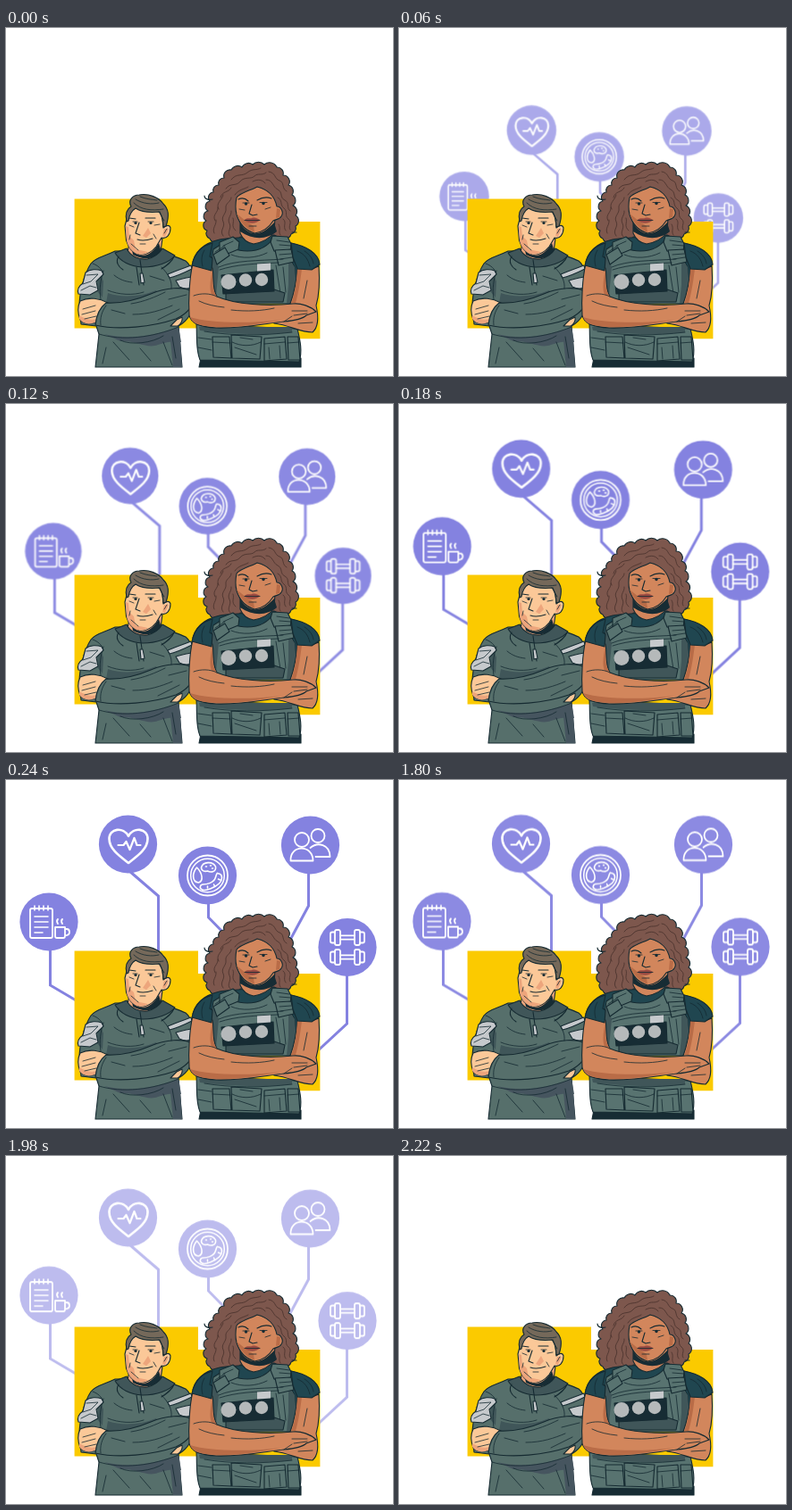
Write an HTML page that moves like this. It is 433x390 px and loops after 2.25 s.

```html
<!DOCTYPE html>
<html lang="en">
<head>
<meta charset="utf-8">
<title>Team wellbeing</title>
<style>
  html, body { margin: 0; width: 100%; height: 100%; overflow: hidden; background: #fff; }
  svg { display: block; width: 433px; height: 390px; }
  .people { stroke: #152a31; stroke-width: 1.1; stroke-linejoin: round; stroke-linecap: round; }
  .line { fill: none; }
  .thin { fill: none; stroke-width: .8; }
  .flat { stroke: none; }
  .jacket { fill: #566f6b; }
  .shade { fill: #405659; }
  .slate { fill: #46555f; }
  .vest { fill: #587370; }
  .shirt { fill: #204650; }
  .ink { fill: #172c34; }
  .grey { fill: #c6c9cc; }
  .pale { fill: #fbc898; }
  .paleShade { fill: #eda57c; }
  .tan { fill: #d2865c; }
  .tanShade { fill: #b96c47; }
  .hairM { fill: #75695a; }
  .hairW { fill: #7d574d; }
  .curl { fill: none; stroke: #4d352f; stroke-width: .9; }
  .links { fill: none; stroke: #8482e0; stroke-width: 3; }
  .icon { fill: none; stroke: #fff; stroke-width: 1.8; stroke-linejoin: round; stroke-linecap: round; }
  .disc { fill: #8482e0; stroke: none; }
</style>
</head>
<body>
<svg viewBox="0 0 433 390">
  <defs>
    <circle id="disc" class="disc" r="32.6"/>
    <g id="dumbbell">
      <path d="M-8-2.2H8M-8 2.2H8"/>
      <rect x="-14" y="-8.5" width="6" height="17" rx="2"/>
      <rect x="8" y="-8.5" width="6" height="17" rx="2"/>
      <path d="M-14-6h-3q-2 0-2 2v8q0 2 2 2h3M14-6h3q2 0 2 2v8q0 2-2 2h-3"/>
    </g>
  </defs>

  <g id="icons" opacity="0">
    <path class="links" d="M49.500 188V230L86 251.500M138 102 170.500 130V200M226.500 137V154L248 176M338.500 103V141L311 192M381.500 218V273L345 307"/>

    <g class="icon" transform="translate(48 159)">
      <use href="#disc"/>
      <path d="M-19-15H2q2 0 2 2V16q0 2-2 2H-19q-2 0-2-2V-13q0-2 2-2Z"/>
      <path d="M-16-18v5M-11-18v5M-6-18v5M-1-18v5M-16-6H-1M-16 0H-1M-16 6H-1M-16 12H-7" stroke-width="1.6"/>
      <path d="M7 6H18V16q0 2-2 2H9q-2 0-2-2ZM18 8h2q3 0 3 3.500t-5 4M10-3q-2 2 0 5M15-3q-2 2 0 5"/>
    </g>

    <g class="icon" transform="translate(136.500 72)">
      <use href="#disc"/>
      <path stroke-width="2.600" d="M.5 21C-10 13-21 5-21-6C-21-18-5-20 .5-9C6-20 22-18 22-6C22 5 11 13 .5 21Z"/>
      <path stroke-width="2.200" d="M-11 1H-5L-2-3 2 6 7-7 10 1H14"/>
    </g>

    <g class="icon" transform="translate(225.500 107)">
      <use href="#disc"/>
      <circle r="22.500"/>
      <circle r="18.800" stroke-width="1.500"/>
      <g stroke-width="1.600">
        <path d="M-12-9C-6-3-4 6-10 8C-18 7-17-3-12-9Z"/>
        <path d="M-7-9C-5-16 6-16 9-10C10-4 4-3 0-5C-3-4-7-5-7-9Z"/>
        <path d="M-2-10h1M3-11h1M5-8h1"/>
        <path d="M13-2c4 1 4 7 0 11S-2 18-6 16s-2-6 1-6S7 9 9 2 11-2 13-2ZM12 4l2 1M7 10l1 2M0 12v2"/>
      </g>
    </g>

    <g class="icon" transform="translate(340.500 73)" stroke-width="1.600">
      <use href="#disc"/>
      <circle cx="-9.500" cy="-6" r="8"/>
      <path d="M-22 17.500C-23-1 3-1 3 17.500Z"/>
      <circle cx="8.500" cy="-10.500" r="7.500"/>
      <path d="M0 3C8-4 22-1 22 13H6"/>
    </g>

    <g class="icon" transform="translate(382 187.500)">
      <use href="#disc"/>
      <use href="#dumbbell" y="-11"/>
      <use href="#dumbbell" y="11"/>
    </g>
  </g>

  <path fill="#fbca00" d="M76.600 191.500H215V217H351.400V348.300H230V336.500H76.600Z"/>

  <!-- man -->
  <g class="people">
    <path class="jacket" d="M122 250C110 256 100 257 95 264C87 276 82 298 82 312L84 332 101 334 104 343 100 380H197L193 334C204 328 211 316 211 300C211 284 210 268 201 261C190 256 180 254 174 249Z"/>
    <path class="slate flat" d="M110 343C138 350 166 345 193 335L196 352C188 350 180 352 170 355C158 360 146 350 128 351ZM184 350l11-2 2 32h-10Z"/>
    <path class="thin" d="M104 343c26 8 60 4 89-8M120 352l18 20M128 350c12 6 36 3 48-5M176 352l10 26M112 358l-4 18M150 359l12 14M186 346l4 24"/>
    <path class="paleShade" d="M138 240L136 252C144 260 158 262 172 258L175 236Z"/>
    <path class="ink flat" d="M141 249c8 9 20 9 30-8l3 10c-8 9-22 9-32 3Z"/>
    <path class="shade" d="M122 252L135 247C139 256 149 260 158 259C166 257 172 252 175 247L189 255C183 263 168 268 153 268C139 267 128 262 122 252Z"/>
    <path class="line" d="M150 260l4 28M146 268l3 20M126 256c-4 6 0 12 5 15M188 256c-2 6-8 10-14 14"/>
    <path class="grey" d="M150 275h3l2 10-4 1Z"/>

    <path class="pale" d="M137 206L133 222 134.500 238C137 246 142 252 149 254C156 255 163 251 168 245L174 235C180 237 184 231 184 224C183 220 179 221 176 224L174 204C162 201 148 198 137 206Z"/>
    <path class="paleShade flat" d="M134 222l3 1 1 10 5 5 2 10 14 3c-4 3-9 3-13 2-6-3-10-9-11-15ZM177 225l5 0-4 9-3-1ZM159 224l3 6-5 5-4-2Z"/>
    <path class="hairM" d="M135 217C133 209 135 203 140 200C136 193 142 187 149 187C160 185 171 190 176 197C182 203 183 210 179 222L176 223C176 216 174 210 172 206C162 207 151 206 145 202C140 205 138 210 137 216Z"/>
    <path class="thin" d="M143 196c8 8 20 9 33 7M145 192c8 5 18 6 26 4M150 189c7 3 13 3 19 4M171 206l6 10"/>
    <path class="line" d="M138 213l7 1M156 213l11 0M149 218l-4 12 5 2M147 237c6 2 11 1 17-1"/>
    <path class="thin" d="M142 217h5M159 217h6M138 221l5 2M166 221l6-1M139 232l-1 5M165 231l3 5M150 242l6 0M140 242l8 7M180 225l-3 5"/>
    <g class="ink flat"><circle cx="145" cy="218.500" r="1.600"/><circle cx="162" cy="218.500" r="1.600"/></g>

    <path class="shade flat" d="M114 297c14 5 34 5 54-3l2 4c-18 7-42 9-58 10ZM103 270l6 14-1 18-6-7Z"/>
    <path class="pale" d="M83 306C93 301 105 303 114 308L106 326C99 332 89 333 83 327C80 319 80 312 83 306Z"/>
    <path class="paleShade flat" d="M82 322c8 5 15 6 23 3l-3 4c-8 4-16 3-20-3Z"/>
    <path class="thin" d="M86 315l14-4M85 321l15-4M88 326l13-3"/>
    <path class="jacket" d="M112 308C132 309 148 304 162 298C178 291 198 289 211 296C212 309 204 320 190 326C164 335 126 339 100 333C101 322 104 314 112 308Z"/>
    <path class="thin" d="M112 311c-5 7-7 14-6 22M140 309c14-2 28-8 38-13M142 321c18 0 32-5 44-10M170 327l24-12M182 304l20-5M118 316l15 4M106 304c-2-12 0-22 3-32M114 294c12 5 28 6 40 2M174 268c8 8 12 16 11 24M161 278l16 5M121 277c6 5 12 7 20 8M97 264c6 2 10 6 12 11"/>
    <path class="pale" d="M184 334l7-7 6-3c1 4-2 9-5 10Z"/>

    <path class="grey" d="M89 274C94 270 102 270 107 272L109 276 101 284 103 294 94 299 81 298C79 292 83 288 86 286Z"/>
    <path class="thin" d="M90 277l13-1-8 8-9 3M84 294l10-5 7 2"/>
    <path class="grey" d="M181 276C190 272 199 269 207 266L208 270C200 274 192 278 183 280Z"/>
    <path class="grey" d="M190 283C197 281 204 279 209 279L210 290C204 293 198 292 194 290Z"/>
  </g>

  <!-- woman -->
  <g class="people">
    <path class="hairW" d="M228 236a6 6 0 0 1-3-9a6 6 0 0 1-1-11a6 6 0 0 1 2-11a6 6 0 0 1 2-11a6 6 0 0 1 4-10a6 6 0 0 1 6-8a6 6 0 0 1 6-8a7 7 0 0 1 8-9a8 8 0 0 1 12-3a8 8 0 0 1 12-3a9 9 0 0 1 13 0a9 9 0 0 1 14 3a7 7 0 0 1 7 9a7 7 0 0 1 6 11a7 7 0 0 1 4 11a7 7 0 0 1 1 12a7 7 0 0 1 3 11a7 7 0 0 1 0 12a7 7 0 0 1-5 9a7 7 0 0 1-9 5L262 234a8 8 0 0 1-13 5a8 8 0 0 1-12 0a6 6 0 0 1-9-3Z"/>
    <path class="line" d="M231 192c-4 1-9 0-9-4M320 229l5 0"/>
    <path class="curl" d="M252 170c6-8 12-3 18-8s10-2 15-5M246 180c5-7 11-2 16-8s12-2 16-6 8 0 13-4M240 190c2-8 9-5 12-11M238 203c-4-7 4-10 5-16M234 216c-4-7 4-9 3-15M233 230c-3-6 3-9 2-15M243 233c-5-6 3-10 0-16s4-9 3-15 6-7 6-12M251 234c-5-5 2-9-1-15s3-9 2-14M257 227c-6-5-1-9-3-14M294 161c8 1 6 8 12 10s2 9 8 12M291 170c8 0 7 8 13 11s2 9 8 12 1 9 6 12M304 190c6 3 2 8 7 12s0 8 5 12-1 8 2 12M310 214c5 4-1 8 3 13M305 220c3 5-1 8 2 12M276 172c6-3 11-2 14 2M256 187c4-6 10-6 15-9"/>

    <path class="shirt" d="M246 236C228 238 213 246 209 262L210 268 231 271 240 300H322L327 270 343 270 350 266C349 253 336 246 319 241L300 232Z"/>
    <path class="tan" d="M262 216L262 230C265 237 271 241 277 242C288 240 295 236 300 229L301 212Z"/>
    <path class="ink flat" d="M262 218C268 230 282 238 300 218L303 228C292 237 277 238 262 228Z"/>
    <path class="tan" d="M258 190C263 184 274 182 281 178C294 181 301 190 303 200C308 200 311 207 308 211C306 215 302 214 299 216C294 224 287 229 278 230C268 227 261 219 258 209C256 201 257 195 258 190Z"/>
    <path class="tanShade flat" d="M258 208c4 9 9 16 20 21l-1-7-9-6ZM303 202l4 1-1 9-4 1Z"/>
    <path class="line" d="M260 192c4-2 8-1 11 2M281 193c5-3 11-4 16-2M275 198l-3 10 4 2 5-1"/>
    <path fill="#9a4b42" class="flat" d="M267 215c3-3 6-1 8-2 3-1 6 0 9 2-4 5-13 5-17 0Z"/>
    <path class="thin" d="M265 196h7M284 195.500h8M267 215.500h17M261 203l6 1M290 203l6-2M272 222h8"/>
    <g class="ink flat"><circle cx="268.500" cy="197" r="1.700"/><circle cx="288" cy="196.500" r="1.700"/></g>

    <path class="vest" d="M232 248L246 239C250 246 258 250 270 250C284 250 294 244 300 234L317 240C315 250 318 260 323 268L326 309H232C229 290 228 268 232 248Z"/>
    <path class="shade flat" d="M232 251l6 17-3 32h-4c-2-17-2-33 1-49ZM316 258l7 10 3 40h-12l2-20Z"/>
    <path class="vest" d="M239 240l15-6 7 6-1 8-17 7-4-3ZM298 233l17 1 4 8-1 10-18-2-4-10Z"/>
    <path class="vest" d="M232 254l13-8 5 9-14 10ZM301 249l18-1 3 14-17 4Z"/>
    <path class="thin" d="M243 244l11-5M234 251l11-7M303 238l14 2M306 243l13 1M306 254l13-1M307 259l13-2M238 268c18-8 44-7 72-9M239 271c18-6 40-7 66-8M252 254c12 5 28 4 40-2M310 268l3 28M302 266l5 31"/>
    <path class="shade" d="M246 296l54-3 12 4-2 10H246Z"/>
    <path class="ink" d="M241 277L299 271 300 295 243 298Z"/>
    <path class="grey flat" d="M281 264.500l15-1v8l-15 1Z"/>
    <g fill="#b5b9ba" class="flat"><circle cx="249" cy="284.500" r="8.500"/><circle cx="268" cy="282.500" r="7.200"/><circle cx="286" cy="282" r="7.200"/></g>

    <path class="ink" d="M218 370H330V380H216Z"/>
    <path class="vest" d="M213 332C214 345 212 360 217 372L328 374C332 362 329 350 326 337Z"/>
    <path class="shade flat" d="M216 335h104v6c-36 4-70 2-103-2Z"/>
    <path class="vest" d="M231 346h19l2 24-20-1ZM252 344l34 2-2 25-31-1ZM289 348l23-2 2 25-25 2ZM315 346h12l2 26h-13Z"/>
    <path class="thin" d="M215 347l15 2M215 358l15 3M231 352l20 1M253 352c10 5 22 5 32 0M256 358l24 8M289 354l23-2M294 358l1 13M306 356l1 14M315 353l13-1M262 347l14 2M222 340c30 5 64 5 98 1"/>

    <path class="tan" d="M326 269C325 284 322 298 318 309L302 314 300 331C318 333 328 341 343 341C351 334 349 320 347 311C351 297 351 281 350 267L342 270Z"/>
    <path class="tanShade flat" d="M326 270l5 0c-2 16-4 28-7 38l-5 1c5-12 6-26 7-39Z"/>
    <path class="tan" d="M209 264C205 281 204 306 205 322C207 332 218 335 235 336C265 337 291 331 311 329C322 328 332 326 336 322L347 318C341 312 330 308 321 309C293 312 257 310 236 301C230 291 233 278 231 269Z"/>
    <path class="tanShade flat" d="M206 324c18 6 62 8 102 3l-22 4c-26 4-46 5-62 3-10-1-16-4-18-10ZM231 271c0 12-1 22 5 30l-6-2c-3-8-1-18 1-28Z"/>
    <path class="thin" d="M210 300c8-3 18-3 26 1M216 306c8 4 18 6 28 7M252 316c18 2 34 1 48-2M311 329l9-6M320 317l17 0M322 322l15-2M327 331l16-1M337 283l-4 20"/>
    <path class="shirt" d="M319 241C335 244 350 252 351 265L342 271 326 270 321 257Z"/>
    <path class="shirt" d="M231 241C219 244 211 252 208 266L230 272 231 258 228 256Z"/>
    <path class="thin" d="M326 250c8 3 12 9 14 17M334 250c6 4 9 8 10 14M222 249c-3 5-4 11-2 18"/>
  </g>
</svg>
<script>
  const icons = document.getElementById('icons');
  const LOOP = 2250, STEP = 30, ENTER = 240, LEAVE_AT = 1770, LEAVE = 450;
  const clamp = v => Math.min(1, Math.max(0, v));
  const easeOut = (v, power) => 1 - (1 - v) ** power;

  function draw() {
    const t = Math.floor(performance.now() % LOOP / STEP) * STEP;
    const enter = easeOut(clamp(t / ENTER), 4);
    const leave = clamp((t - LEAVE_AT) / LEAVE);
    const scale = .53 + .47 * enter;
    const rise = -4 * easeOut(leave, 2);
    icons.setAttribute('opacity', enter * (1 - leave));
    icons.setAttribute('transform',
      `translate(216 ${358 + rise}) scale(${scale}) translate(-216 -358)`);
    requestAnimationFrame(draw);
  }
  draw();
</script>
</body>
</html>
```
